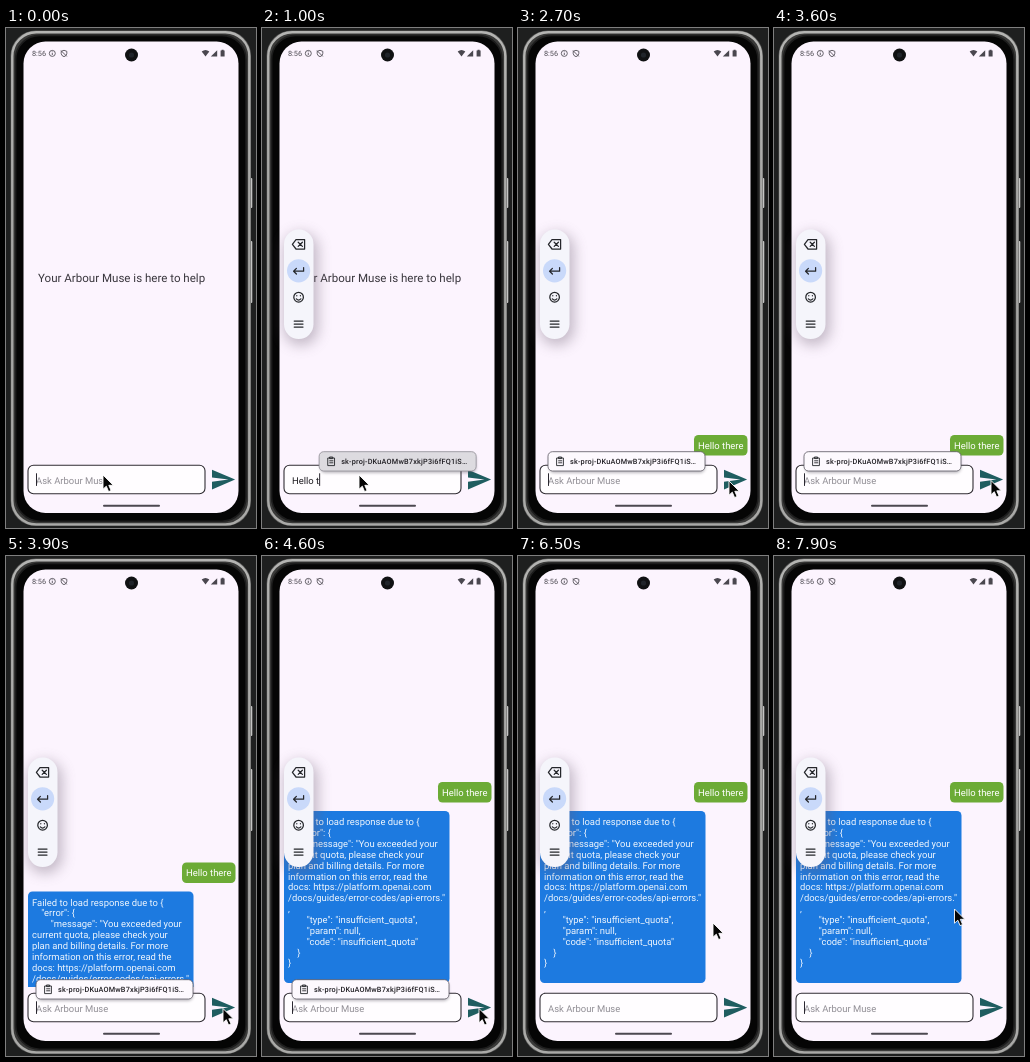
Animation of 250 by 500 pixels, one loop 8000 ms. Source, as an HTML page:

```html
<!DOCTYPE html>
<html lang="en">
<head>
<meta charset="utf-8">
<title>Garden chat</title>
<style>
  html, body { margin: 0; width: 100%; height: 100%; overflow: hidden; background: #1e1f1f; }
  svg { display: block; width: 250px; height: 500px; }
  text { font-family: Roboto, Arial, sans-serif; white-space: pre; text-rendering: geometricPrecision; }
  .body { font-size: 9.45px; }
  .line { fill: none; stroke: #25272b; stroke-width: 1.25; stroke-linecap: round; stroke-linejoin: round; }
  .status { fill: none; stroke: #55525a; stroke-width: .9; }
</style>
</head>
<body>
<svg viewBox="0 0 250 500" xmlns="http://www.w3.org/2000/svg">
  <defs>
    <linearGradient id="metal" x1="0" y1="0" x2="0" y2="1">
      <stop offset="0" stop-color="#b4b4b2"/>
      <stop offset=".5" stop-color="#a3a3a1"/>
      <stop offset="1" stop-color="#aaaaa8"/>
    </linearGradient>
    <filter id="soft" x="-150%" y="-40%" width="400%" height="180%"><feGaussianBlur stdDeviation="7"/></filter>
    <filter id="low" x="-10%" y="-50%" width="120%" height="200%"><feGaussianBlur stdDeviation="1.5"/></filter>
    <clipPath id="list"><rect x="17" y="40" width="216" height="391"/></clipPath>
  </defs>

  <!-- phone -->
  <rect width="250" height="500" fill="#1e1f1f"/>
  <rect x="243.5" y="150" width="2.8" height="30" rx="1" fill="#c4c4c3"/>
  <rect x="243.5" y="213" width="2.8" height="62" rx="1" fill="#c4c4c3"/>
  <rect x="4.6" y="2.6" width="240.4" height="495.4" rx="25" fill="#5c5c5b"/>
  <rect x="6.3" y="4.2" width="237" height="492.2" rx="24" fill="#3a3a39" stroke="url(#metal)" stroke-width="2.4"/>
  <rect x="9.6" y="7.4" width="230.4" height="485.8" rx="24" fill="#050505" stroke="#1d1d1d" stroke-width="1.6"/>
  <rect x="17.5" y="13.5" width="215" height="471.5" rx="22" fill="#fcf4fe"/>
  <circle cx="125.5" cy="27" r="6.5" fill="#101113"/>
  <circle cx="125.5" cy="27" r="2.6" fill="#20242a"/>

  <!-- status bar -->
  <text x="26" y="28" font-size="7.3" fill="#4d4a52">8:56</text>
  <g class="status">
    <circle cx="46.3" cy="25.4" r="3"/>
    <path d="M46.3 25v2M46.3 23.5v.8"/>
    <path d="M58 22.3l2.8 1v2.2q0 2.2-2.8 3.2-2.8-1-2.8-3.2v-2.2zM55 22.6l5.8 5.8"/>
  </g>
  <g fill="#4a474f">
    <path d="M195.7 23.6q3.8-3.1 7.6 0l-3.8 5z"/>
    <path d="M211.2 22.2v6.4h-6.4z"/>
    <path d="M214.6 22.6h1v-.8h2v.8h1v6h-4z"/>
  </g>

  <text id="title" x="32" y="254" font-size="11.55" fill="#39363d">Your Arbour Muse is here to help</text>

  <g clip-path="url(#list)">
    <g id="chat">
      <rect x="176" y="407" width="53.5" height="20.5" rx="4.5" fill="#6cab36"/>
      <text class="body" x="180" y="420.5" fill="#fff">Hello there</text>
      <rect x="22" y="436" width="165.5" height="172" rx="4.5" fill="#1d7ae0"/>
      <g id="reply" fill="#eef5fd"></g>
    </g>
  </g>

  <!-- input row -->
  <rect x="22" y="437.2" width="177" height="28.5" rx="5.5" fill="#fffdff" stroke="#302d33" stroke-width="1.1"/>
  <text id="hint" class="body" x="30" y="455.5" fill="#918e95">Ask Arbour Muse</text>
  <text id="typed" class="body" x="30" y="455.5" fill="#1d1b20"></text>
  <rect id="caret" y="445.3" width="1" height="12.6" fill="#2a2730"/>
  <path transform="translate(203.8 438.4) scale(1.1)" fill="#1f5d60" d="M2 21L23 12 2 3v7l15 2-15 2z"/>
  <rect x="97" y="476.8" width="57" height="2" rx="1" fill="#4c4850"/>

  <!-- floating tool pill -->
  <g id="tools">
    <rect x="22" y="205" width="34" height="112" rx="16" fill="#6a5c70" opacity=".4" filter="url(#soft)"/>
    <rect x="22" y="201.5" width="29.5" height="109.5" rx="14.7" fill="#f5f5fb"/>
    <circle cx="36.6" cy="242.8" r="11.6" fill="#c9d9fa"/>
    <g class="line">
      <path d="M34 211.6h8.6v9.4H34l-3.6-4.7zM36.2 214.2l4.2 4.2M40.4 214.2l-4.2 4.2"/>
      <path d="M41.6 239.6v3.6h-9.8M34.4 240.4l-2.8 2.8 2.8 2.8"/>
      <circle cx="36.6" cy="269.2" r="4.8"/>
      <path d="M34.4 270.8q2.2 2.4 4.4 0M34.8 267.6v.2M38.4 267.6v.2"/>
      <path d="M32.2 293h8.8M32.2 296h8.8M32.2 299h8.8"/>
    </g>
  </g>

  <!-- clipboard chip -->
  <g id="chip">
    <rect x="1" y="425.5" width="156" height="19.5" rx="5" fill="#403a48" opacity=".35" filter="url(#low)"/>
    <rect id="chipBox" y="423.7" width="157" height="19.3" rx="4.5" stroke-width=".8"/>
    <g class="line" style="stroke-width:.9">
      <path d="M9 430h6.4v7.6H9zM10.8 429h2.8v1.6h-2.8zM10.6 432.8h3.2M10.6 434.8h3.2"/>
    </g>
    <text x="22" y="436.2" font-size="7.3" font-weight="500" letter-spacing=".2" fill="#1f1d22">sk-proj-DKuAOMwB7xkjP3i6fFQ1iS…</text>
  </g>

  <path id="pointer" d="M0 0v14.2l3.3-3 2.3 5.4 2.5-1.1-2.3-5.2h4.5z" fill="#050505" stroke="#fff" stroke-width=".9" stroke-linejoin="round"/>
</svg>

<script>
const LOOP = 8000, STEP = 100, SENT = 2600;
const $ = id => document.getElementById(id);
const set = (id, name, value) => $(id).setAttribute(name, value);
const show = (id, amount) => { $(id).style.opacity = amount; };

const reply = [
  'Failed to load response due to {',
  '    "error": {',
  '        "message": "You exceeded your',
  'current quota, please check your',
  'plan and billing details. For more',
  'information on this error, read the',
  'docs: https://platform.openai.com',
  '/docs/guides/error-codes/api-errors."',
  ',',
  '        "type": "insufficient_quota",',
  '        "param": null,',
  '        "code": "insufficient_quota"',
  '    }',
  '}'
];
reply.forEach((line, i) => {
  const row = document.createElementNS('http://www.w3.org/2000/svg', 'text');
  row.setAttribute('x', 26);
  row.setAttribute('y', 450.2 + i * 10.86);
  row.setAttribute('class', 'body');
  row.textContent = line;
  $('reply').append(row);
});

// [time, characters typed]
const keys = [[0, 0], [500, 1], [600, 2], [800, 4], [900, 6], [1000, 7],
  [1100, 8], [1300, 9], [1500, 10], [1700, 11], [SENT, 0]];

// [time, x, y]
const path = [[0, 97, 447], [1200, 97, 447], [2000, 210.5, 453], [2600, 210.5, 453],
  [3200, 217, 452.5], [6100, 217, 452.5], [6500, 195, 367], [6900, 193, 358],
  [7800, 180.5, 353], [LOOP, 180.5, 353]];

const clamp = v => Math.max(0, Math.min(1, v));
const ramp = (t, from, to) => clamp((t - from) / (to - from));
const smooth = p => p * p * (3 - 2 * p);

function pointerAt(t) {
  const i = path.findIndex((p, n) => n > 0 && t <= p[0]);
  const [t0, x0, y0] = path[i - 1], [t1, x1, y1] = path[i];
  const p = smooth(ramp(t, t0, t1));
  return [x0 + (x1 - x0) * p, y0 + (y1 - y0) * p];
}

function draw(t) {
  const [edited, count] = keys.filter(k => k[0] <= t).pop();
  const sent = t >= SENT;

  $('typed').textContent = 'Hello there'.slice(0, count);
  const caretX = 30 + (count ? $('typed').getComputedTextLength() : 0);
  set('caret', 'x', caretX);
  show('caret', Math.floor((t - edited) / 500) % 2 ? 0 : 1);
  show('hint', count ? 0 : 1);
  show('title', sent ? 0 : 1);

  show('chat', sent ? 1 : 0);
  const rise = 1 - (1 - ramp(t, 3700, 4300)) ** 2;
  set('chat', 'transform', `translate(0 ${-181 * rise})`);

  show('tools', ramp(t, 400, 600));
  show('chip', ramp(t, 700, 900) * (1 - ramp(t, 5000, 5200)));
  set('chip', 'transform', `translate(${caretX} 0)`);
  set('chipBox', 'fill', sent ? '#fdf9fe' : '#dddbe0');
  set('chipBox', 'stroke', sent ? '#5c5962' : '#8f8c94');

  set('pointer', 'transform', `translate(${pointerAt(t)})`);
}

const start = performance.now();
function tick() {
  const t = (performance.now() - start) % LOOP;
  draw(Math.floor(t / STEP) * STEP);
  requestAnimationFrame(tick);
}
tick();
</script>
</body>
</html>
```
